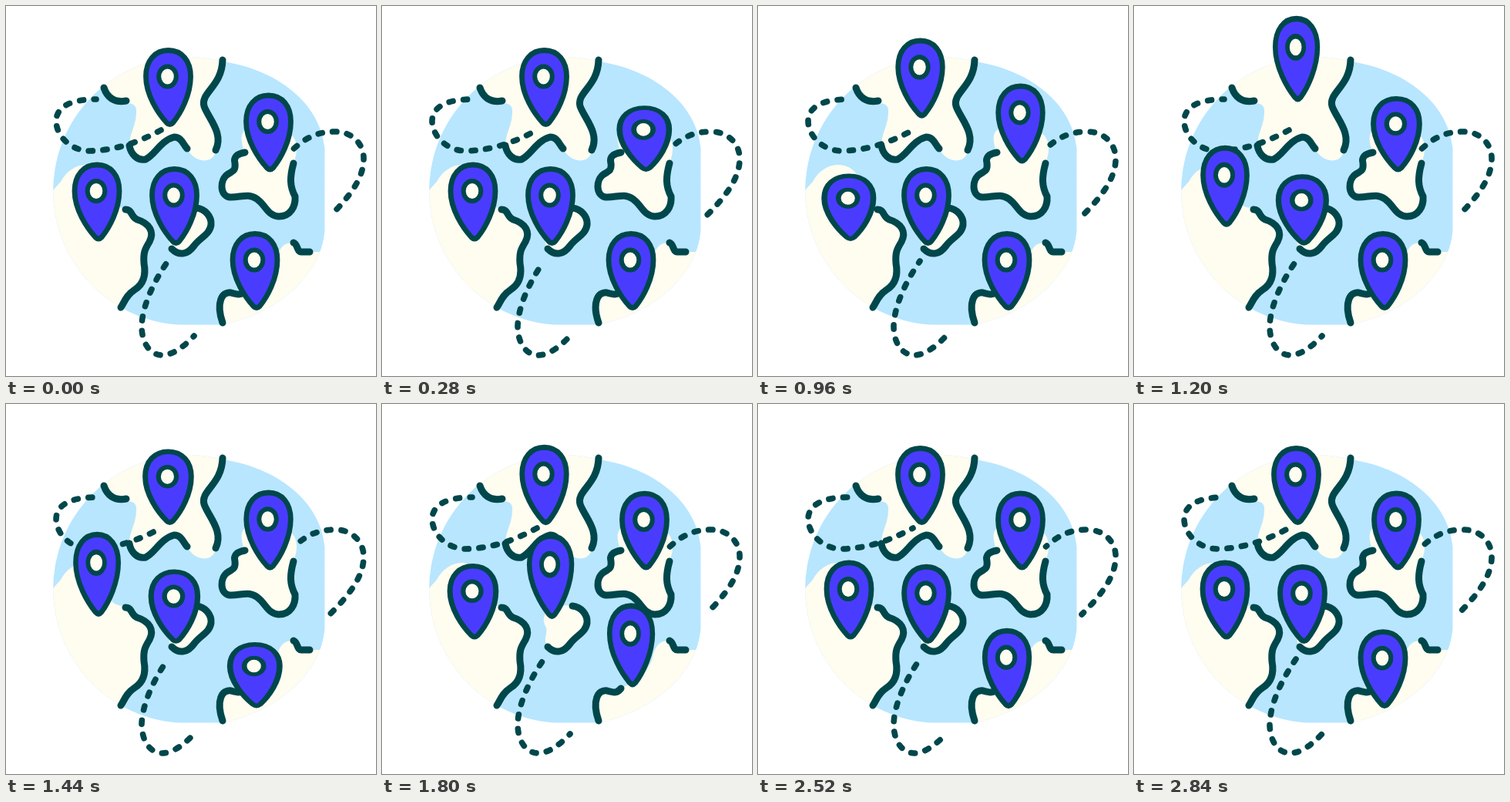
An HTML page that plays this animation: 480x480 px, repeating every 2.88 s.

```html
<!DOCTYPE html>
<html lang="en">
<head>
<meta charset="utf-8">
<title>Globe with bouncing pins</title>
<style>
  html, body { margin: 0; width: 100%; height: 100%; overflow: hidden; background: #fff; }
  svg { display: block; width: 100%; height: 100%; }
  #land { fill: #fffcf0; }
  #coast, #routes { fill: none; stroke: #00474b; stroke-linecap: round; stroke-linejoin: round; }
  #coast { stroke-width: 9; }
  #routes { stroke-width: 7.6; stroke-dasharray: 5.2 13.5; }
</style>
</head>
<body>
<svg viewBox="0 0 480 480">
  <defs>
    <clipPath id="globe">
      <path d="M281 72C350 82 408 125 413.5 185V290C410 350 350 400 281 413.5H224A174 174 0 1 1 281 72Z"/>
    </clipPath>
    <g id="pin" stroke="#00474b" stroke-width="6.8" stroke-linejoin="round">
      <path fill="#4a3cff" d="M-4 -2C-15 -14 -31 -38 -31 -62C-31 -83 -19 -96 -2 -96C16 -96 27 -82 27 -62C27 -38 14 -14 4 -2Q0 2 -4 -2Z"/>
      <ellipse cx="-3" cy="-62" rx="11.3" ry="13" fill="#fffcf0" stroke-width="6"/>
    </g>
  </defs>
  <g clip-path="url(#globe)">
    <rect width="480" height="480" fill="#b8e6ff"/>
    <path id="land"/>
  </g>
  <path id="coast"/>
  <g id="routes">
    <path d="M201 161C180 172 150 187 109 188C85 188 66 170 65 150C65 130 85 121 117 121"/>
    <path d="M373.5 185C390 170 405 163 427 163C450 163 465 180 464 200C463 225 445 248 420 273"/>
    <path stroke-dashoffset="4" d="M244 428C225 448 212 453 202 453C185 452 176 435 176 415C177 390 190 360 210 331"/>
  </g>
  <g id="pins"></g>
</svg>
<script>
const LOOP = 2880, DASH = 18.7, DASH_TIME = 600;
const $ = id => document.getElementById(id);

// Each outline alternates an inked shore with a plain edge.
const lands = [
  ['127 106C131 118 140 126 156 123', '157 126Q170 126 169 138C169 155 160 165 160 181',
   '160 181C162 192 170 201 181 199C193 194 200 175 218 170C228 170 230 180 235 185', '238 190C248 203 268 206 273 187',
   '272 187C283 165 262 145 257 130C252 112 280 105 281 70', '281 60H110V106'],
  ['310 190C299 192 295 196 297 204C298 213 295 214 288 218C277 225 277 246 290 248C303 249 314 242 325 250C337 258 339 272 354 273C369 273 376 260 375 247C368 234 368 222 373 204',
   '373 204C380 186 378 172 367 164C350 154 318 152 308 163C303 171 307 180 309 191'],
  ['155 264C164 264 162 274 170 277C186 282 193 293 186 306C180 316 178 320 179 334C182 350 178 361 167 368C155 376 154 384 149 391',
   '148 395L60 430V240L71 228C78 215 90 206 104 206C120 207 133 215 133 240C132 255 140 262 155 262'],
  ['247 262C258 263 267 273 266 284C264 297 252 300 244 311C236 322 225 325 215 315',
   '215 315C208 306 215 300 213 290C207 280 209 270 222 266C232 263 240 259 247 262'],
  ['281 411C272 385 280 370 292 372C302 375 305 375 310 369', '310 369C325 362 348 348 352 325C355 312 363 306 373 307',
   '373 307C379 309 377 320 384 319H394', '420 319V430H281'],
];
$('land').setAttribute('d', lands.map(edges => `M${edges.join('L')}Z`).join(''));
$('coast').setAttribute('d', lands.flatMap(edges => edges.filter((_, i) => i % 2 === 0)).map(shore => 'M' + shore).join(''));

// Tip position and the moment the pin is highest.
const pins = [
  { x: 212.5, y: 153.5, peak: 1160 },
  { x: 342.5, y: 212, peak: 760 },
  { x: 120, y: 302, peak: 1360 },
  { x: 220.5, y: 307.5, peak: 1750 },
  { x: 325, y: 391.5, peak: 1900 },
];
for (const pin of pins) {
  pin.node = document.createElementNS('http://www.w3.org/2000/svg', 'use');
  pin.node.setAttribute('href', '#pin');
  $('pins').append(pin.node);
}

const CROUCH = 590, AIR = 255;

// Crouch, jump, then a damped wobble; time is relative to the peak.
function poseAt(time) {
  if (time < -CROUCH) return { scale: 1, lift: 0 };
  if (time < -AIR) {
    const progress = (time + CROUCH) / (CROUCH - AIR);
    return { scale: 1 - .17 * Math.sin(Math.PI * progress ** .75), lift: 0 };
  }
  if (time < AIR) {
    const height = Math.cos(Math.PI / 2 * time / AIR);
    return { scale: 1 + .09 * height ** 2, lift: 34 * height };
  }
  const landed = time - AIR;
  return { scale: 1 - .18 * Math.exp(-landed / 150) * Math.sin(Math.PI * landed / 280), lift: 0 };
}

const routes = [...$('routes').children].map(node => ({ node, shift: Number(node.getAttribute('stroke-dashoffset')) }));

function draw(now) {
  const t = now % LOOP;
  for (const { node, x, y, peak } of pins) {
    const { scale, lift } = poseAt(t - peak);
    const width = 1 + (1 - scale) * .65;
    node.setAttribute('transform', `translate(${x} ${y - lift}) scale(${width} ${scale})`);
  }
  for (const { node, shift } of routes) {
    node.setAttribute('stroke-dashoffset', shift + t / DASH_TIME * DASH);
  }
  requestAnimationFrame(draw);
}
draw(performance.now());
</script>
</body>
</html>
```
